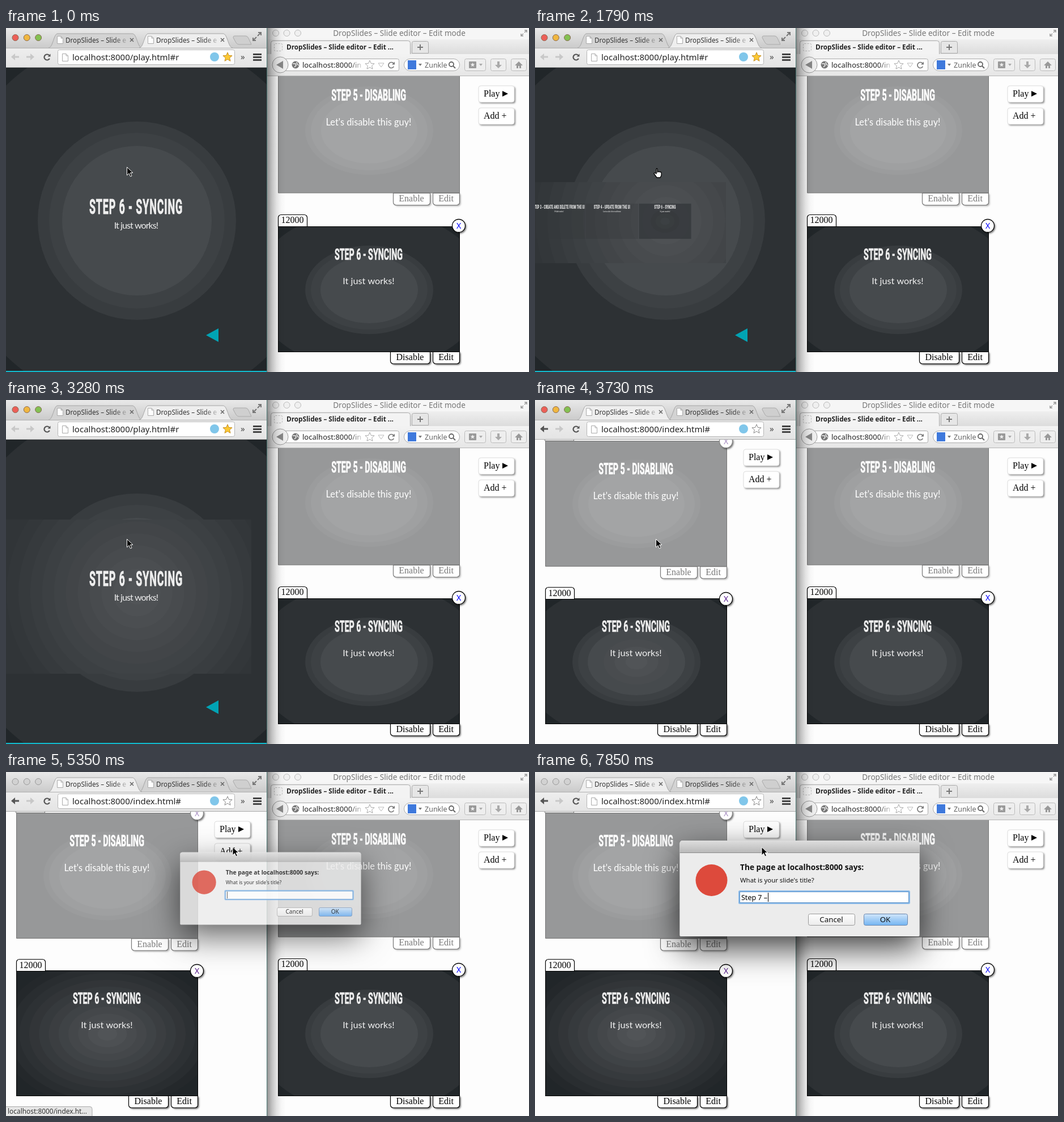
Write an HTML page with a canvas that moves like this. It is 923x607 px and loops after 8000 ms.

```html
<!DOCTYPE html>
<html lang="en">
<head>
<meta charset="utf-8">
<title>Slide editor</title>
<style>
html, body { margin: 0; width: 100%; height: 100%; overflow: hidden; background: #fff; }
canvas { display: block; }
</style>
</head>
<body>
<canvas id="stage" width="923" height="607"></canvas>
<script>
const c = document.getElementById('stage').getContext('2d');
const LOOP = 8000, TICK = 148;
const UI = '"Noto Sans", "Open Sans", sans-serif';
const SERIF = '"Liberation Serif", serif';
const LATO = 'Lato, sans-serif';
const HEAD = 'Roboto, sans-serif';
const CONDENSED = .5;
const STEPS = [
  ['STEP 1 - OPEN THE EDITOR', 'Here we go!'],
  ['STEP 2 - UPDATE A SLIDE', 'Just type!'],
  ['STEP 3 - CREATE AND DELETE FROM THE UI', 'Multi tasks!'],
  ['STEP 4 - UPDATE FROM THE UI', 'Let us do it in real time'],
  ['STEP 6 - SYNCING', 'It just works!']
];

const clamp = v => Math.max(0, Math.min(1, v));
const lerp = (a, b, k) => a + (b - a) * k;
const easeOut = p => 1 - Math.pow(1 - clamp(p), 2.2);
const smooth = p => { p = clamp(p); return p * p * (3 - 2 * p); };
const shade = k => `rgb(${45 + 36 * k},${49 + 35 * k},${52 + 35 * k})`;

function layer(draw) { c.save(); draw(); c.restore(); }

function rect(x, y, w, h, fill) { c.fillStyle = fill; c.fillRect(x, y, w, h); }

function paint(fill, stroke, width = 1) {
  if (fill) { c.fillStyle = fill; c.fill(); }
  if (stroke) { c.shadowColor = 'transparent'; c.strokeStyle = stroke; c.lineWidth = width; c.stroke(); }
}

function box(x, y, w, h, r, fill, stroke, width) {
  c.beginPath();
  c.roundRect(x, y, w, h, r);
  paint(fill, stroke, width);
}

function oval(x, y, rx, ry, fill, stroke, width) {
  c.beginPath();
  c.ellipse(x, y, rx, ry, 0, 0, 7);
  paint(fill, stroke, width);
}

const disc = (x, y, r, fill, stroke, width) => oval(x, y, r, r, fill, stroke, width);

function icon(x, y, d, fill, stroke, width) {
  layer(() => {
    c.translate(x, y);
    const p = new Path2D(d);
    if (fill) { c.fillStyle = fill; c.fill(p); }
    if (stroke) { c.strokeStyle = stroke; c.lineWidth = width || 1; c.stroke(p); }
  });
}

function text(str, x, y, font, color, align = 'left', spacing = 0) {
  c.font = font;
  c.textAlign = align;
  c.letterSpacing = spacing + 'px';
  c.fillStyle = color;
  c.fillText(str, x, y);
}

function heading(str, x, y, size, color, spacing = 0) {
  layer(() => {
    c.translate(x, y);
    c.scale(CONDENSED, 1);
    text(str, 0, 0, `700 ${size}px ${HEAD}`, color, 'center', spacing);
    c.strokeStyle = color;
    c.lineWidth = size / 40;
    c.strokeText(str, 0, 0);
  });
}

function vertical(y0, y1, a, b) {
  const g = c.createLinearGradient(0, y0, 0, y1);
  g.addColorStop(0, a);
  g.addColorStop(1, b);
  return g;
}

function horizontal(x0, x1, a, b) {
  const g = c.createLinearGradient(x0, 0, x1, 0);
  g.addColorStop(0, a);
  g.addColorStop(1, b);
  return g;
}

function clipped(x, y, w, h, draw) {
  layer(() => { c.beginPath(); c.rect(x, y, w, h); c.clip(); draw(); });
}

// Concentric ellipses from radius `from` inwards, brightness k0 to k1
function bands(x, y, from, ratio, n, k0, k1) {
  for (let i = 0; i < n; i++) {
    const r = from * (1 - i / n);
    oval(x, y, r, r * ratio, shade(lerp(k0, k1, i / (n - 1))));
  }
}

function star(x, y, r, fill, stroke) {
  c.beginPath();
  for (let i = 0; i < 10; i++) {
    const a = i * Math.PI / 5 - Math.PI / 2, q = i % 2 ? r * .45 : r;
    c.lineTo(x + q * Math.cos(a), y + q * Math.sin(a));
  }
  c.closePath();
  paint(fill, stroke);
}

function reload(x, y, color, width) {
  c.beginPath();
  c.arc(x, y, 5, .5, 5.5);
  paint(null, color, width);
  icon(x, y, 'M6-6V-1H1Z', color);
}

const pageIcon = (x, y) => icon(x, y, 'M.5.5H7L10.5 4V13.5H.5ZM7 .5V4H10.5', '#fff', '#aaa');

function chromeTab(x, active) {
  icon(x, 10, 'M0 25C8 25 9 0 16 0H148C156 0 157 25 165 25', active ? '#eee' : '#d3d3d3', '#a4a4a4');
  pageIcon(x + 15, 14);
  clipped(x + 28, 10, 110, 25, () =>
    text('DropSlides – Slide e', x + 30, 26, `11.7px ${UI}`, '#333'));
  const tone = active ? '238,238,238' : '211,211,211';
  rect(x + 115, 14, 23, 17, horizontal(x + 115, x + 138, `rgba(${tone},0)`, `rgba(${tone},.8)`));
  icon(x + 147, 21, 'M-3-3L3 3M3-3L-3 3', null, '#666', 1.5);
}

function leftChrome(playing, focused) {
  rect(0, 0, 461, 36, vertical(0, 36, '#e9e9e9', '#cacaca'));
  rect(0, 35, 461, 34, vertical(35, 69, '#eee', '#e4e4e4'));
  rect(0, 69, 461, 1, '#a9a9a9');
  ['#ec5f58', '#f0b740', '#83c152'].forEach((tone, i) =>
    disc(16.5 + i * 20.3, 17, 5.5, focused ? tone : '#d2d2d2', focused ? '#8a6a55' : '#999'));
  chromeTab(playing ? 75 : 235, false);
  rect(0, 35, 461, 1, '#b0b0b0');
  chromeTab(playing ? 235 : 75, true);
  icon(401, 14, 'M2 0H22Q25 0 27 4L32 15H10Q7 15 5 12L0 3Q0 0 2 0Z', '#cfcfcf', '#aaa');
  icon(443, 15, 'M1-1L7-7M2-7H7V-2M-1 1L-7 7M-2 7H-7V2', null, '#777', 2);

  icon(16, 51, 'M-7 0L0-6V-1.5H7V1.5H0V6Z', playing ? '#c8c8c8' : '#555');
  icon(43, 51, 'M7 0L0-6V-1.5H-7V1.5H0V6Z', '#c8c8c8');
  reload(72.5, 51.5, '#555', 2.2);
  box(91.5, 38.5, 312, 26, 3, '#fff', '#b6b6b6');
  pageIcon(99, 45);
  text('localhost:8000/' + (playing ? 'play.html#r' : 'index.html#'), 117, 57, `15px ${UI}`, '#222');
  disc(368, 51, 8, '#80c6ea');
  star(391, 51.5, 8.5, playing ? '#fcc933' : '#fff', playing ? '#c58d22' : '#888');
  text('»', 414, 56, `15px ${UI}`, '#444');
  for (const y of [45, 50, 55]) rect(436, y, 15, 3, '#444');
}

function rightChrome() {
  rect(461, 0, 462, 20, '#f6f6f6');
  rect(461, 20, 462, 26, vertical(20, 46, '#efefef', '#dcdcdc'));
  rect(461, 46, 462, 38, vertical(46, 84, '#f3f3f3', '#e6e6e6'));
  rect(461, 84, 462, 1, '#b5b5b5');
  for (const x of [476, 495.5, 515]) disc(x, 9, 5.5, '#f0f0f0', '#bbb');
  text('DropSlides – Slide editor – Edit mode', 694, 14, `13.6px ${UI}`, '#777', 'center');
  icon(914, 9, 'M1-1L5-5M1-5H5V-1M-1 1L-5 5M-1 5H-5V1', null, '#999', 1.5);
  box(467.5, 22.5, 246, 25, [4, 4, 0, 0], '#f3f3f3', '#aaa');
  rect(467, 46, 247, 3, '#f2f2f2');
  layer(() => { c.setLineDash([3, 2]); box(473.5, 27.5, 14, 13, 2, null, '#bbb'); });
  text('DropSlides – Slide editor – Edit ...', 495, 38, `700 11.75px ${UI}`, '#222');
  box(716.5, 23.5, 29, 21, [3, 3, 0, 0], '#e6e6e6', '#aaa');
  icon(731, 34, 'M-5 0H5M0-5V5', null, '#777', 2);

  box(490, 54.5, 203.5, 21, 3, '#fff', '#aaa');
  disc(484, 65, 14, '#eee', '#999');
  icon(484, 65, 'M-7 0L5-7V7Z', '#888');
  disc(511, 65, 6.5, '#777');
  icon(511, 65, 'M-5-2H0L1 1L-2 4M2-5L3-1L6 1', null, '#eee', 1.5);
  text('localhost:8000/in', 523, 70, `13px ${UI}`, '#222');
  rect(606, 56, 30, 18, horizontal(606, 632, 'rgba(255,255,255,0)', '#fff'));
  star(642, 65.5, 8.5, '#fff', '#aaa');
  icon(662, 65, 'M-5-3H5L0 4Z', '#fff', '#bbb');
  reload(680, 65.5, '#777', 1.7);
  box(702.5, 54.5, 98, 21, 11, '#fff', '#aaa');
  rect(709, 57, 15, 16, '#3f79dc');
  icon(731, 65, 'M-3-2H3L0 2Z', '#777');
  text('Zunkle', 739, 70, `12.5px ${UI}`, '#666');
  disc(786, 64, 4, null, '#666', 1.8);
  icon(789, 67, 'M0 0L4 4', null, '#666', 2);
  for (const [x, w] of [[809.5, 37], [855.5, 27], [891.5, 27]]) box(x, 54.5, w, 21, 3, '#eee', '#bbb');
  box(817, 59, 13, 12, 1, '#999');
  star(823.5, 65, 4, '#eee');
  icon(838, 65, 'M-3-2H3L0 2Z', '#aaa');
  icon(869, 65, 'M-2-6H2V0H6L0 6L-6 0H-2Z', '#aaa');
  icon(905, 65, 'M0-6L7 1H4V6H1V2H-1V6H-4V1H-7Z', '#999');
}

function shadowOn(alpha = .55) {
  c.shadowColor = `rgba(0,0,0,${alpha})`;
  c.shadowBlur = 3;
  c.shadowOffsetX = c.shadowOffsetY = 2;
}

function hangingButton(label, x, y, w, color) {
  layer(() => {
    shadowOn(color === '#000' ? .6 : .3);
    box(x + .5, y + .5, w, 21, [0, 0, 5, 5], '#fff', color, 1.2);
  });
  text(label, x + w / 2, y + 15, `16px ${SERIF}`, color, 'center');
}

function panelButton(label, x, y, marker) {
  layer(() => { shadowOn(.45); box(x, y, 63, 29, 4, '#fff', '#ddd'); });
  text(label, x + 9, y + 19, `16px ${SERIF}`, '#000');
  if (marker) icon(x + 42, y + 14, 'M0-5L10 0L0 5Z', '#000');
}

function closeBadge(x, y, color, ring) {
  layer(() => { shadowOn(); disc(x, y, 11.5, '#fff', ring, 1.3); });
  text('X', x, y + 5, `14px ${UI}`, color, 'center');
}

function editor(x, drop, panelX, panelY, link, detail) {
  const mid = x + 161, top = 70 + drop, end = 291 + drop;
  clipped(x, top, 321, 221, () => {
    rect(x, top, 321, 221, '#979899');
    oval(mid, 181 + drop, 113, 78, '#9b9c9d');
    oval(mid, 181 + drop, 103, 70, '#9fa0a1');
    oval(mid, 181 + drop, 85, 58, '#a3a4a5');
  });
  box(x + .5, top, 320, 221, 0, null, '#777');
  heading('STEP 5 - DISABLING', mid - 1, 128 + drop, 28.5, '#fff');
  text("Let's disable this guy!", mid - 1, 172 + drop, `16.3px ${LATO}`, '#fff', 'center');
  hangingButton('Enable', x + 203, end, 65, '#777');
  hangingButton('Edit', x + 273, end, 47, '#777');

  clipped(x, 350, 321, 222, () => {
    rect(x, 350, 321, 222, shade(-.32));
    if (detail > 1) bands(mid, 462, 190, .69, 11, -.25, 1);
    else {
      oval(mid, 462, 206, 142, shade(0));
      oval(mid, 462, 113, 78, shade(.3));
      oval(mid, 462, 103, 70, shade(.45));
      oval(mid, 462, 86, 59, shade(.7));
      if (detail) bands(mid, 462, 58, .69, 3, .78, 1);
    }
  });
  box(x + .5, 350.5, 320, 221, 0, null, '#000');
  heading('STEP 6 - SYNCING', mid - 1, 408.5, 28.5, '#f0f0f0');
  text('It just works!', mid - 1, 452, `16.2px ${LATO}`, '#f2f2f2', 'center');
  const sink = drop ? 2 : 0;
  box(x + .5, 329.5 + sink / 2, 51, 21, [5, 5, 0, 0], '#fff', '#000', 1.2);
  text('12000', x + 5.5, 344 + sink, `16px ${SERIF}`, '#000');
  closeBadge(x + 319, 349 + sink, link, '#000');
  hangingButton('Disable', x + 198, 571, 70, '#000');
  hangingButton('Edit', x + 273, 571, 47, '#000');
  panelButton('Play', panelX, panelY, true);
  panelButton('Add +', panelX, panelY + 39, false);
}

function rightPage() {
  rect(461, 85, 462, 522, '#fdfdfd');
  editor(480, 0, 834, 102, '#00f', 0);
}

// Shadow of the front window on the one behind it
function windowShadow() {
  const g = c.createLinearGradient(461, 0, 494, 0);
  for (let i = 0; i <= 4; i++) g.addColorStop(i / 4, `rgba(0,0,0,${.42 * (1 - i / 4) ** 2})`);
  rect(461, 0, 33, 607, g);
}

function leftEditor(detail) {
  rect(0, 70, 461, 537, '#fdfdfd');
  clipped(0, 70, 461, 537, () => {
    editor(18, 2.5, 368, 87, '#551a8b', detail);
    box(17.5, 60, 51, 12, 0, '#fff', '#777');
    closeBadge(337, 73, '#a58bc0', '#888');
  });
}

function slideText(step, x, y, offset) {
  heading(step[0], x, y + offset + 13, 36, '#eee', 1.7);
  text(step[1], x, y + offset + 39, `16.2px ${LATO}`, '#eee', 'center', -1);
}

function player(t) {
  const away = t < 2300 ? easeOut((t - 1150) / 1000) : 1 - easeOut((t - 2330) / 926);
  const s = lerp(1, .13, away);
  clipped(0, 70, 461, 537, () => {
    rect(0, 70, 461, 537, shade(-.32));
    disc(231, 340, 332, shade(0));
    disc(231, 340, 175, shade(.3));
    disc(231, 340, 155, shade(.45));
    disc(231, 340, 132, shade(.7));
    if (t >= 1480) {
      const grown = t > 2300 ? s : 0;
      const w = Math.max(337, 230 + 203 * grown), h = Math.max(143, 272 * grown);
      clipped(0, lerp(343.5, 347, grown) - h / 2, w, h, () => {
        rect(0, 70, 461, 537, shade(.1));
        bands(231, 340, 230, 1, 11, .17, 1);
      });
    }
    STEPS.forEach((step, i) => layer(() => {
      const back = i - STEPS.length + 1;
      c.translate(229.5 + back * 407 * s, 341);
      c.scale(s, s);
      c.globalAlpha = away * (back ? .4 : .9);
      rect(-200, -135, 400, 270, shade(.2));
      if (!back) bands(0, 0, 110, .8, 3, .27, .45);
      c.globalAlpha = 1;
      slideText(step, 0, 0, lerp(-26, -118, away));
    }));
    icon(353, 542, 'M0 0L22-12V12Z', '#00a3b4');
    rect(0, 605, 461, 2, '#12b9cc');
  });
}

function dialogShadow() {
  layer(() => {
    c.beginPath();
    c.rect(-500, -500, 2000, 2000);
    c.roundRect(255.5, 121, 423, 169, [5, 5, 2, 2]);
    c.clip('evenodd');
    c.shadowColor = 'rgba(0,0,0,.75)';
    c.shadowBlur = 56;
    c.shadowOffsetY = 21;
    box(255.5, 121, 423, 169, [5, 5, 2, 2], '#ececec');
  });
}

function dialog(t) {
  const scale = t < 5400 ? .754 : t < 5550 ? 1.03 : 1;
  const pulse = .5 - .5 * Math.cos(t / 1000 * Math.PI * 2);
  layer(() => {
    c.translate(466.5, 205.5);
    c.scale(scale, scale);
    c.translate(-466.5, -205.5);
    c.globalAlpha = scale < 1 ? .8 : 1;
    dialogShadow();
    box(255.5, 121, 423, 169, [5, 5, 2, 2], '#ececec');
    box(255.5, 121, 423, 21, [5, 5, 0, 0], vertical(121, 142, '#dedede', '#b9b9b9'));
    rect(255.5, 142, 423, 1, '#8b8b8b');
    disc(311.5, 191, 28, '#dd4a3c');
    text('The page at localhost:8000 says:', 362, 173, `700 13.7px ${UI}`, '#111');
    text("What is your slide's title?", 362, 195, `11.4px ${UI}`, '#111');
    box(360.5, 210.5, 300, 21, 1, '#fff', '#8bbbe9', 3);
    box(361.5, 211.5, 298, 19, 0, null, '#5d92c8');
    const typed = 'Step 7 –'.slice(0, t < 6210 ? 0 : t < 6360 ? 1 : t < 6500 ? 3 : t < 6650 ? 4
      : t < 6800 ? 5 : t < 6950 ? 6 : t < 7540 ? 7 : 8);
    text(typed, 364, 226, `12.5px ${UI}`, '#000');
    if (t < 5800 || t > 6200) rect(365 + c.measureText(typed).width, 213, 1, 16, '#000');
    const blue = `rgb(${lerp(120, 90, pulse)},${lerp(183, 166, pulse)},242)`;
    box(482.5, 250.5, 82, 20, 3, vertical(250, 271, '#fff', '#ebebeb'), '#999');
    box(580.5, 250.5, 77, 20, 3, vertical(250, 271, '#d3e7fa', blue), '#6a86ad');
    text('Cancel', 523, 265, `13.3px ${UI}`, '#111', 'center');
    text('OK', 618, 265, `13.3px ${UI}`, '#111', 'center');
  });
}

function pointer(t) {
  const k = smooth((t - 4180) / 740);
  const x = lerp(213, 399.5, k), y = lerp(245, 132, k);
  const hand = t > 1450 && t < 2600 || t > 4900 && t < 5250;
  if (hand) icon(x - 3, y + 2, 'M4 10V2Q5 0 6 2V7Q7 5 8.5 7Q10 5.5 11 7.5Q13 6.5 13 9V13L11 17H5L0 10Q0 8 2 9Z', '#fff', '#000', 1.3);
  else icon(x, y, 'M.5.5V15L4 11.5L6.5 17L9 16L6.5 10.5H11Z', '#000', '#fff', 1);
}

function statusBar() {
  box(-2, 590.5, 154, 20, [0, 4, 0, 0], '#e6e6e6', '#aaa');
  text('localhost:8000/index.ht...', 3, 603, `11.9px ${UI}`, '#333');
}

function draw(t) {
  const playing = t < 3700, open = t >= 5320;
  c.clearRect(0, 0, 923, 607);
  rightPage();
  rightChrome();
  windowShadow();
  if (playing) player(t);
  else leftEditor(open ? 2 : 1);
  leftChrome(playing, !open);
  rect(460, 0, 1, 607, '#4a7773');
  if (t > 4900 && t < 5450) statusBar();
  if (open) dialog(t);
  pointer(t);
}

function frame(now) {
  const t = now % LOOP;
  draw(Math.floor(t / TICK) * TICK);
  requestAnimationFrame(frame);
}
requestAnimationFrame(frame);
</script>
</body>
</html>
```
